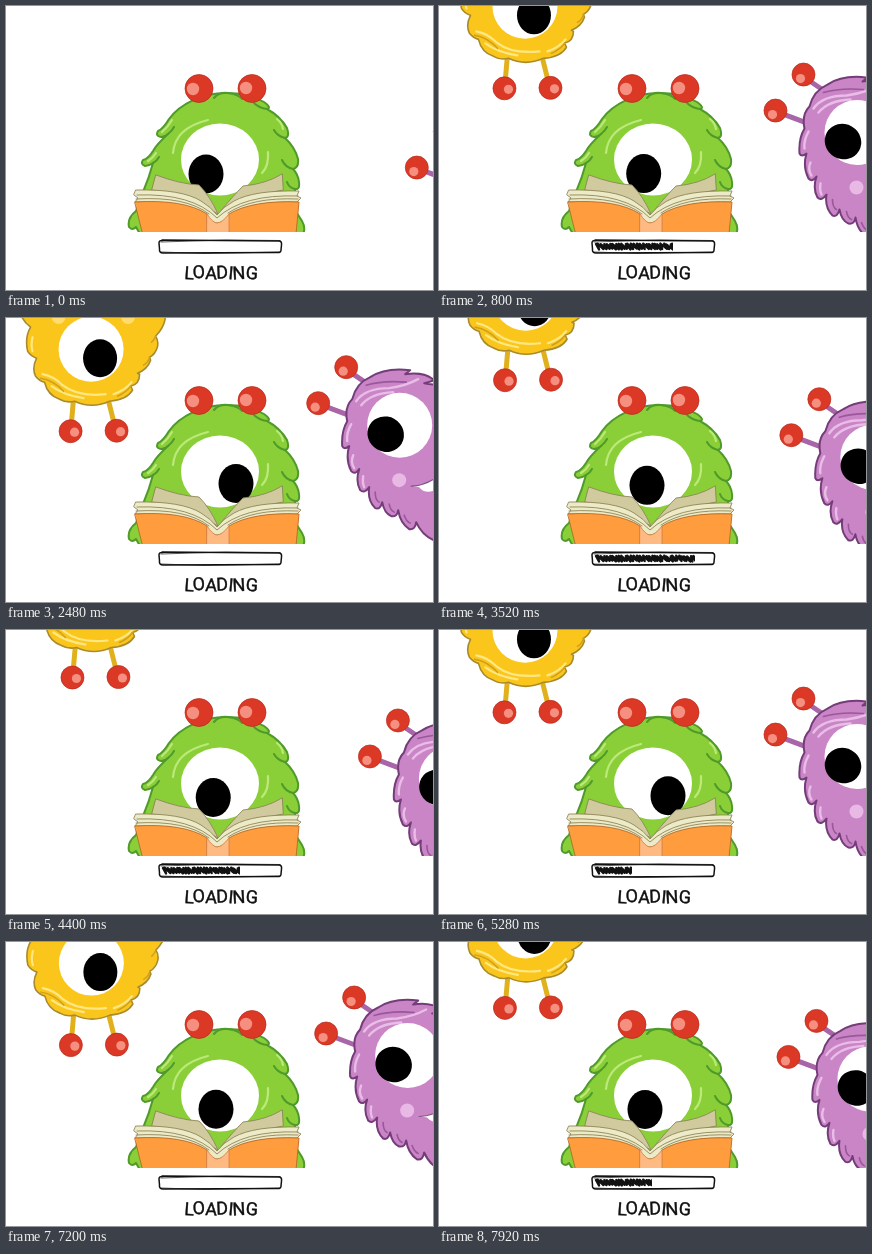
An HTML page that plays this animation: 427x284 px, repeating every 8000 ms.

```html
<!DOCTYPE html>
<html lang="en">
<head>
<meta charset="utf-8">
<title>Loading</title>
<style>
  html, body { margin: 0; width: 100%; height: 100%; overflow: hidden; background: #fff; }
  svg { display: block; width: 100vw; height: 100vh; }
  path { stroke-linecap: round; stroke-linejoin: round; }
  .line { fill: none; }
  text { font: 400 18px Roboto, "Open Sans", sans-serif; letter-spacing: -.2px; fill: #111; stroke: #111; stroke-width: .4; }
</style>
</head>
<body>
<svg viewBox="0 0 427 284">
  <defs>
    <clipPath id="scene"><rect width="427" height="226"/></clipPath>
    <clipPath id="fill"><rect id="level" x="154" y="235" width="0" height="11"/></clipPath>
  </defs>

  <g clip-path="url(#scene)">
    <g id="yellow">
      <path class="line" stroke="#e0b11c" stroke-width="5" d="M68 90L66 113M102 89L108 113"/>
      <path fill="#fac61c" stroke="#a98a2c" stroke-width="1.6" d="M13-6Q13 10 25 19Q19 29 22 43Q25 48 31 50Q26 60 30 68Q34 73 39 74Q42 87 54 91Q61 95 69 93Q86 101 104 93Q121 92 127 82Q126 79 125 78Q134 76 134 66L132 65Q142 61 145 52L144 49Q150 46 152 38Q153 32 150 28Q160 18 160 6L161-6Z"/>
      <g class="line" stroke="#ffe783" stroke-width="2.2">
        <path d="M37 66Q48 68 57 77Q72 89 100 86M46 78Q58 87 78 90M108 86Q120 82 126 74M27 29Q25 37 27 43"/>
      </g>
      <g class="line" stroke="#cf9f1d" stroke-width="1.5">
        <path d="M35 70Q48 72 58 83M112 88Q121 84 125 78M146 34Q149 31 150 28M138 57Q143 54 144 49"/>
      </g>
      <circle cx="53" cy="9" r="6.8" fill="#ffdc70"/>
      <circle cx="122.500" cy="9" r="6.8" fill="#ffdc70"/>
      <circle cx="85.500" cy="41" r="32.5" fill="#fff"/>
      <ellipse cx="94.500" cy="50" rx="17" ry="19"/>
      <g id="yellowBalls"></g>
    </g>

    <g id="purple">
      <path class="line" stroke="#a866a8" stroke-width="5" d="M346 96L314 84M362 66L340 51"/>
      <path fill="#c985c5" stroke="#753c7a" stroke-width="2" d="M480 80Q440 64 411 60Q417 59 421 57Q411 48 392 51Q396 48 397 47Q372 44 357 54Q343 60 339 76Q331 84 334 98Q328 108 329 123Q331 127 336 123Q332 136 338 148Q342 152 346 146Q342 158 347 167Q351 171 356 164Q354 177 362 185Q367 187 369 179Q371 190 378 193Q384 194 385 187Q387 200 396 206Q402 207 403 199Q409 213 423 218Q438 219 480 220Z"/>
      <g class="line" stroke="#e9bde7" stroke-width="2.4">
        <path d="M343 78Q352 65 376 65Q392 63 405 56M348 82Q358 70 380 69M338 101Q333 110 334 118M340 132Q337 139 341 145M350 153Q349 160 351 164"/>
      </g>
      <g class="line" stroke="#9a579c" stroke-width="1.6">
        <path d="M353 62Q370 57 393 59M362 169Q362 177 366 179M376 181Q377 187 381 189M391 192Q393 198 397 200"/>
      </g>
      <path fill="#fff" d="M400 163Q418 161 428 148V164Q413 173 406 164Z"/>
      <path class="line" stroke="#87508a" stroke-width="1.2" d="M398 163Q418 162 430 147"/>
      <circle cx="386" cy="157" r="7" fill="#e9b9e5"/>
      <circle cx="386.500" cy="102" r="32.5" fill="#fff"/>
      <ellipse cx="372.500" cy="111" rx="18.5" ry="17.5" transform="rotate(30 372.500 111)"/>
      <g id="purpleBalls"></g>
    </g>

    <g id="green">
      <path fill="#8acf38" stroke="#4f9a2b" stroke-width="2" d="M220 87C196 87 174 98 163 113Q157 123 152 125Q149 130 155 131Q159 131 162 128Q151 138 147 145Q142 153 137 154Q134 158 139 160Q143 160 147 157Q143 172 137 186L130 205Q121 212 123 221Q126 225 130 221L134 228H297Q300 222 296 215L289 204V183Q294 184 293 176Q292 168 287 163Q293 162 292 153Q289 141 279 132Q284 131 281 122Q274 110 261 103Q266 102 258 96Q242 87 220 87Z"/>
      <g class="line" stroke="#4f9a2b" stroke-width="2">
        <path d="M162 128Q166 125 168 121M147 157Q151 155 153 151M279 132Q271 130 268 124M287 163Q279 161 276 154M289 183Q283 182 281 176M261 103Q253 102 248 97"/>
      </g>
      <g class="line" stroke="#bce97a" stroke-width="2.2">
        <path d="M167 147Q169 122 202 114M262 146Q263 160 256 167M271 113Q276 117 277 123M156 126Q162 121 166 114M142 155Q147 152 150 147"/>
      </g>
      <path class="line" stroke="#4f9a2b" stroke-width="2" d="M208 92Q213 86 222 87Q232 88 236 93"/>
      <ellipse cx="214" cy="153.500" rx="39" ry="36" fill="#fff"/>
      <ellipse id="pupil" cy="167" rx="17.500" ry="19.500"/>
      <g fill="#dc3826" stroke="#b52d1f" stroke-width=".7">
        <circle cx="193" cy="82.500" r="14"/><circle cx="246" cy="82.500" r="14"/>
      </g>
      <circle cx="187" cy="83" r="6.200" fill="#f58f80"/>
      <circle cx="240" cy="82" r="6.200" fill="#f58f80"/>
    </g>

    <g stroke="#8f875b" stroke-width=".9">
      <path fill="#d0ca9e" d="M150 169Q174 178 193 179Q204 190 212 208Q186 190 146 184Z"/>
      <path fill="#d0ca9e" d="M276 168Q260 178 237 180Q227 190 212 208Q240 190 277 184Z"/>
      <path fill="#edeac8" d="M130 184Q176 183 195 195Q205 201 211 209Q217 201 228 195Q248 184 293 185L291 190L295 192L291 196Q246 195 224 209Q216 217 211 217Q206 217 199 208Q178 195 129 196L132 192L128 189Z"/>
      <path class="line" d="M131 189Q186 187 211 212Q237 188 292 190M130 193Q180 190 203 208M222 207Q246 191 292 193"/>
      <path fill="#ff9c3e" stroke="#b96a29" d="M129 196Q178 193 201 208V228H137Z"/>
      <path fill="#ff9c3e" stroke="#b96a29" d="M223 208Q246 194 293 196L290 228H223Z"/>
      <path fill="#ffba82" stroke="#d8864a" d="M201 208Q207 217 211 217Q216 217 223 208V228H201Z"/>
    </g>
  </g>

  <g class="line" stroke="#111">
    <path stroke-width="1.500" d="M156 234L273 235Q276 235 275.500 239L275 244Q275 247 271 246.500L157 247Q153 247 153.500 243L153 237Q153 234 157 234.500"/>
    <path stroke-width=".7" d="M155 236L220 234L274 234.500M155 246L198 247.500L274 246"/>
  </g>
  <g clip-path="url(#fill)">
    <path id="scribble" class="line" stroke="#111" stroke-width="2.400"/>
  </g>
  <text x="178" y="273" rotate="4 -4 3 -3 5 -3 3" dy="0 -.5 .6 -.4 .2 .5 -.6">LOADING</text>
</svg>

<script>
  const LOOP = 8000, STEP = 80, SWAY = 4480, LOW = 1960;
  const LEVELS = [0, 20, 37, 57, 78, 100];
  const LEVEL_MS = 200;
  // time, pupil x
  const GAZE = [[0, 200], [1440, 208], [2480, 230], [3520, 208], [4000, 201],
    [5280, 229], [6480, 214], [7920, 206], [8000, 205]];

  const $ = id => document.getElementById(id);
  const shift = (id, x, y) => $(id).setAttribute('transform', `translate(${x} ${y})`);

  function addBall(id, x, y, dx, dy) {
    $(id).innerHTML += `<g transform="translate(${x} ${y})">
      <circle r="11.5" fill="#dc3826" stroke="#b52d1f" stroke-width=".7"/>
      <circle cx="${dx}" cy="${dy}" r="4.6" fill="#f58f80"/></g>`;
  }
  addBall('yellowBalls', 65, 123, 4, 1);
  addBall('yellowBalls', 111, 122.5, 4, 1);
  addBall('purpleBalls', 305, 80, -3, 4);
  addBall('purpleBalls', 333, 44, -3, 4);

  let seed = 7;
  const rand = () => (seed = seed * 16807 % 2147483647) / 2147483647;
  let marks = 'M157 238';
  for (let x = 157; x < 275; x += 3) {
    marks += `L${x + 3 + rand() * 2} ${242.5 + rand()}L${x + 1 + rand() * 2} ${237.5 + rand()}`;
  }
  $('scribble').setAttribute('d', marks);

  function along(keys, t) {
    const i = Math.max(1, keys.findIndex(k => k[0] >= t));
    const [t0, a] = keys[i - 1], [t1, b] = keys[i];
    const p = (t - t0) / (t1 - t0);
    return a + (b - a) * (.5 - .5 * Math.cos(Math.PI * p));
  }

  function draw(t) {
    // 0 when leaning furthest in, 2 when furthest out
    const out = 1 - Math.cos(2 * Math.PI * (t - LOW) / SWAY);
    const enter = Math.max(0, 1 - t / 640) ** 2;
    shift('yellow', out * 1.1 - .7, -38.5 * out - 64 * enter);
    shift('purple', 30.3 * out - .5 + 48 * enter, 24.2 * out - 1 + 36 * enter);

    const x = along(GAZE, t);
    $('pupil').setAttribute('cx', x);
    $('pupil').setAttribute('cy', 168 - (x - 200) * .08);

    const w = LEVELS[Math.floor(t / LEVEL_MS) % LEVELS.length];
    $('level').setAttribute('width', w ? w + 2 : 0);
  }

  const start = performance.now();
  function tick() {
    const t = (performance.now() - start) % LOOP;
    draw(Math.floor(t / STEP) * STEP);
    requestAnimationFrame(tick);
  }
  tick();
</script>
</body>
</html>
```
